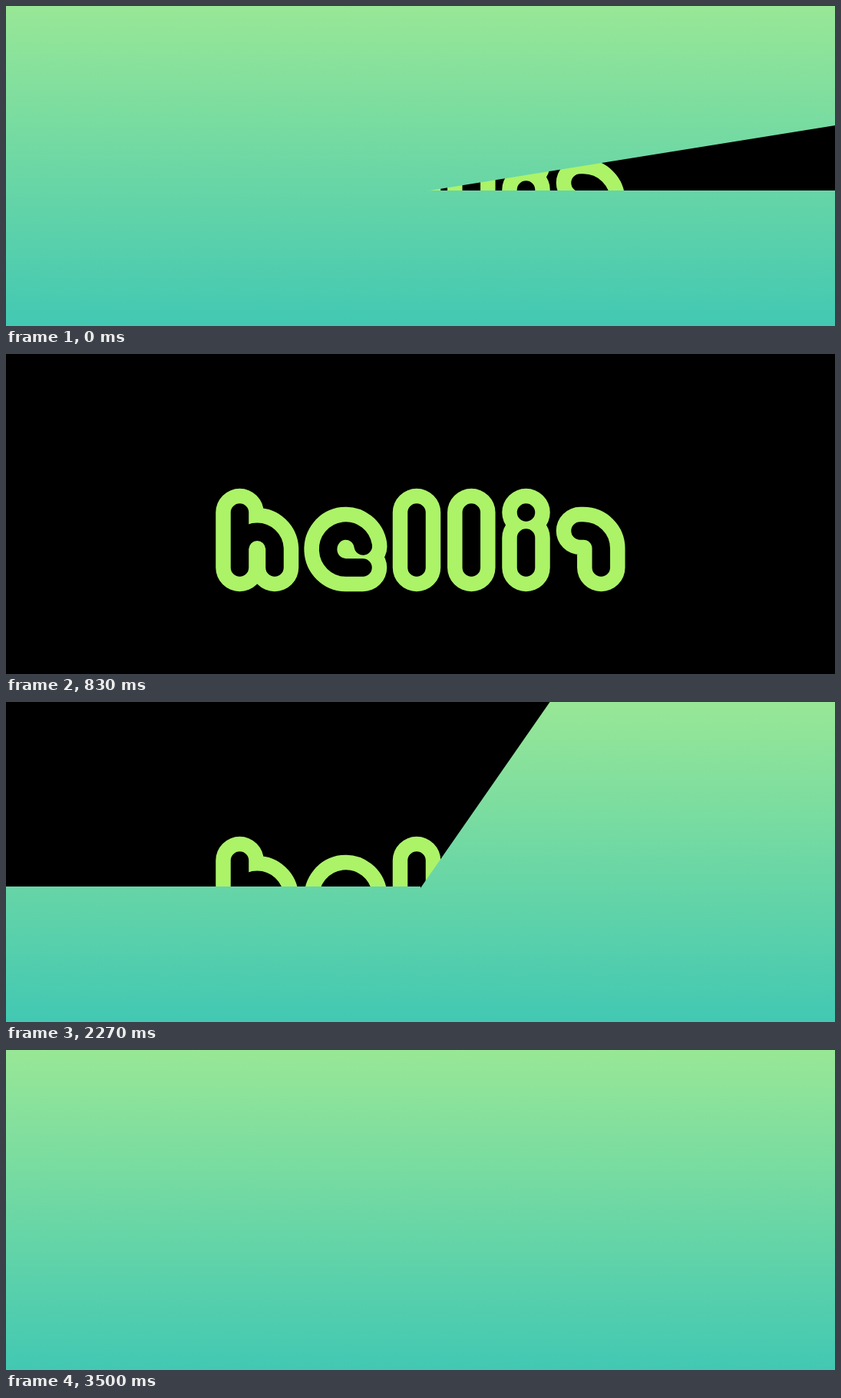
Animation, 1080 px wide and 418 px high, one loop 3.53 s. Source, as an HTML page with a canvas:

```html
<!DOCTYPE html>
<html lang="en">
<head>
<meta charset="utf-8">
<title>Radial wipe lettering</title>
<style>
  html, body { margin: 0; width: 100%; height: 100%; overflow: hidden; background: #000; }
  canvas { display: block; width: 100vw; height: 100vh; }
</style>
</head>
<body>
<canvas width="1080" height="418"></canvas>
<script>
const ctx = document.querySelector('canvas').getContext('2d');
const W = 1080, H = 418, LOOP = 3530;
const EDGE = 241, CX = 540, CY = 243, FAR = 1500;

// Each letter is a skeleton: a wide green stroke with a narrower black one on top.
const lettering = new Path2D([
  'M304.5 207V279M304.5 254A22.8 23.3 0 0 1 350 254V279',
  'M465.3 251A23 24 0 1 0 442.5 279H465',
  'M535 207V279',
  'M606.3 207V279',
  'M677.5 207V207.01M677.5 240V279',
  'M748 231H752.3A23 23 0 0 1 775.3 254V279'
].join(''));

const gradient = ctx.createLinearGradient(0, 0, 0, H);
gradient.addColorStop(0, '#98e796');
gradient.addColorStop(1, '#42c8b3');

function drawLettering() {
  ctx.fillStyle = '#000';
  ctx.fillRect(0, 0, W, H);
  ctx.lineCap = ctx.lineJoin = 'round';
  for (const [width, color] of [[62.5, '#acf368'], [23.5, '#000']]) {
    ctx.lineWidth = width;
    ctx.strokeStyle = color;
    ctx.stroke(lettering);
  }
}

// Fill from the flat edge on one side (1 right, -1 left) round to a moving angle in degrees.
function fillSector(side, angle) {
  const flat = side > 0 ? 0 : -Math.PI;
  ctx.fillStyle = gradient;
  ctx.beginPath();
  ctx.moveTo(CX + (side > 0 ? 13 : 0), EDGE);
  ctx.lineTo(CX + side * FAR, EDGE);
  ctx.arc(CX, CY, FAR, flat, -angle * Math.PI / 180, side < 0);
  ctx.lineTo(CX, CY);
  ctx.fill();
}

function render(time) {
  // 30 steps per second, starting on 10 ms marks
  const step = Math.floor((Math.floor(time / 10) * 10 + 5) * .03);
  const reveal = 9.15 + step * 16.53;
  const cover = 39.9 + (step - 56) * 16.28;
  drawLettering();
  if (cover >= 360) {
    ctx.fillStyle = gradient;
    ctx.fillRect(0, 0, W, H);
  } else if (cover > 0) {
    fillSector(-1, 180 + cover);
  } else if (reveal < 360) {
    fillSector(1, reveal);
  }
}

const begin = performance.now();
function tick() {
  render((performance.now() - begin) % LOOP);
  requestAnimationFrame(tick);
}
tick();
</script>
</body>
</html>
```
